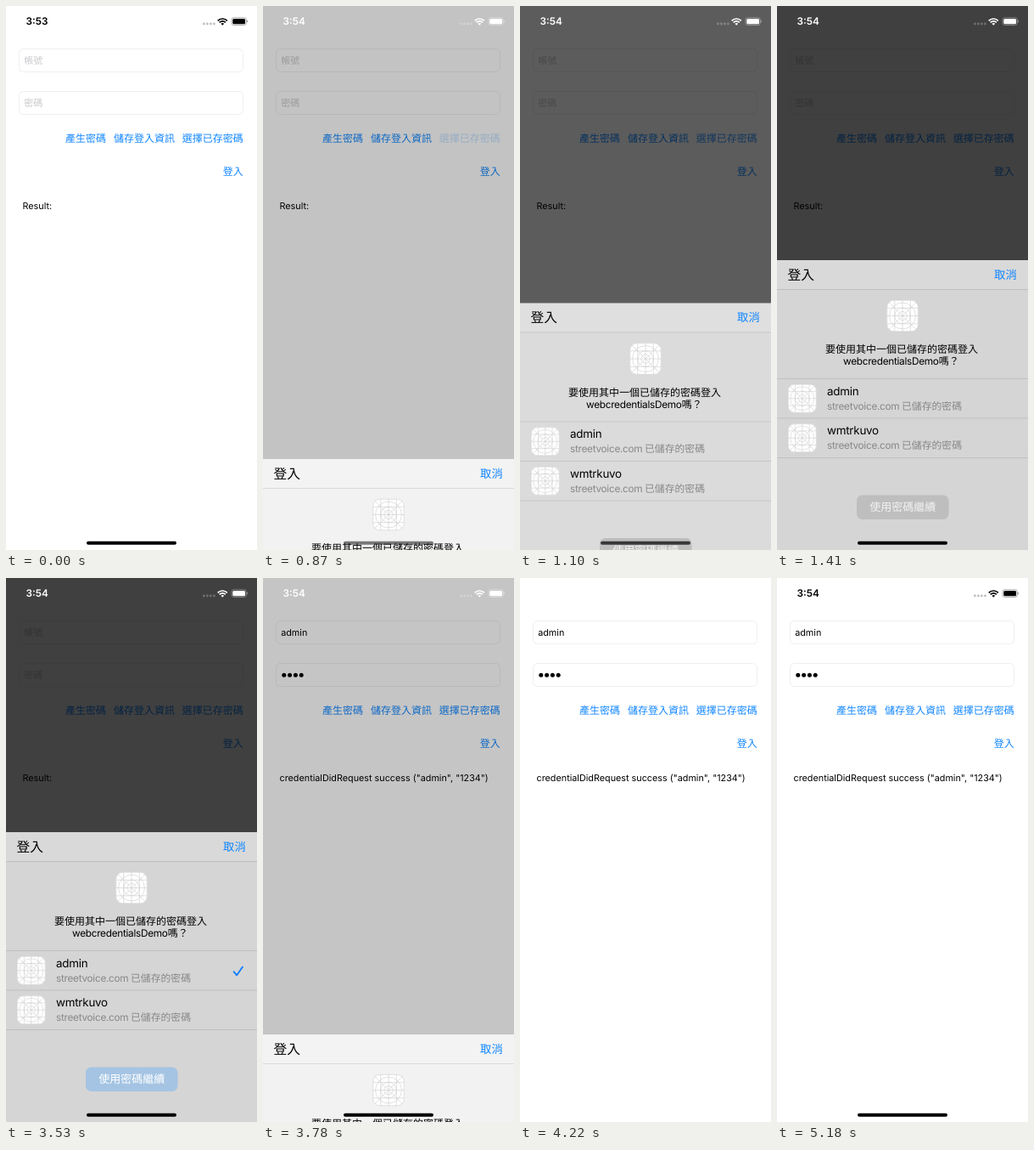
These frames come from a looping animation (296 by 640 pixels, 5.21 s). An HTML page:

```html
<!DOCTYPE html>
<html lang="zh-Hant">
<head>
<meta charset="utf-8">
<title>Saved password sign-in</title>
<style>
  html, body { margin: 0; width: 100%; height: 100%; overflow: hidden; background: #fff; }
  svg { display: block; width: 296px; height: 640px; }
  text { font-family: Inter, "Noto Sans CJK TC", "Noto Sans CJK", sans-serif; white-space: pre;
    text-rendering: geometricPrecision; }
  .small { font-size: 10.8px; }
  .link { font-size: 12px; fill: #1086ff; }
  .hint { font-size: 11.05px; fill: #c9c9cc; }
  .msg { font-size: 12px; }
  .latin { font-size: 11.84px; letter-spacing: -.3px; }
  .name { font-size: 13.4px; letter-spacing: -.25px; }
  .note { font-size: 11.84px; fill: #888; }
  .field { fill: #fff; stroke: #efefef; }
  .rule { stroke: #000; stroke-opacity: .13; stroke-width: .8; }
</style>
</head>
<body>
<svg viewBox="0 0 296 640">
  <defs>
    <g id="icon">
      <rect width="36" height="36" rx="8" fill="#fff"/>
      <g fill="none" stroke="#cdcdcd" stroke-width=".6">
        <rect x=".3" y=".3" width="35.4" height="35.4" rx="7.7"/>
        <path d="M0 9H36M0 18H36M0 27H36M9 0V36M18 0V36M27 0V36M2 2L34 34M34 2L2 34"/>
        <circle cx="18" cy="18" r="15"/>
        <circle cx="18" cy="18" r="9"/>
        <circle cx="18" cy="18" r="5"/>
      </g>
    </g>
  </defs>

  <rect width="296" height="640" fill="#fff"/>
  <rect class="field" x="15.5" y="50.5" width="264" height="27" rx="5"/>
  <rect class="field" x="15.5" y="100.5" width="264" height="27" rx="5"/>
  <g id="empty">
    <text class="hint" x="21.3" y="68">帳號</text>
    <text class="hint" x="21.3" y="118">密碼</text>
    <text class="small" x="19.5" y="239">Result:</text>
  </g>
  <g id="filled">
    <text class="small" x="21.2" y="67.8">admin</text>
    <g id="dots"></g>
    <text class="small" x="19.5" y="239">credentialDidRequest success ("admin", "1234")</text>
  </g>
  <text class="link" x="70" y="159.7">產生密碼</text>
  <text class="link" x="127" y="159.7">儲存登入資訊</text>
  <text class="link" id="pick" x="207.7" y="159.7">選擇已存密碼</text>
  <text class="link" x="255.7" y="199.4">登入</text>

  <rect id="dim" width="296" height="640"/>

  <g id="sheet">
    <rect y="1" width="296" height="343" fill="#fff" fill-opacity=".78"/>
    <rect y="1" width="296" height="34" fill="#fff" fill-opacity=".1"/>
    <text x="12.6" y="23.6" font-size="15.7" font-weight="500">登入</text>
    <text x="256" y="22.8" font-size="13.4" fill="#1086ff">取消</text>
    <path class="rule" d="M0 35.5H296M0 140.5H296M0 187H296M0 233.5H296"/>
    <use href="#icon" transform="translate(129.5 48) scale(1.03)"/>
    <text class="msg" x="57" y="110.4">要使用其中一個已儲存的密碼登入</text>
    <text class="msg" x="78" y="124.4"><tspan class="latin">webcredentialsDemo</tspan>嗎？</text>
    <g id="rows"></g>
    <path id="check" d="M268.6 165.2L272.2 169.3L279 159.6" fill="none" stroke="#0a7cff"
      stroke-width="1.8" stroke-linecap="round" stroke-linejoin="round"/>
    <rect id="button" x="94" y="277.5" width="108.5" height="28.5" rx="6.5"/>
    <text id="label" x="148.2" y="296.4" font-size="13" text-anchor="middle">使用密碼繼續</text>
  </g>

  <g id="status">
    <text id="clock" x="23.6" y="22.3" font-size="11.8" font-weight="600"></text>
    <g id="signal" opacity=".25"></g>
    <path d="M249.7 17.3a8 8 0 0 1 11.2 0M251.7 19.4a5 5 0 0 1 7.2 0" fill="none"
      stroke="currentColor" stroke-width="1.7"/>
    <path d="M255.3 22.8l-1.9-2a2.8 2.8 0 0 1 3.8 0z"/>
    <rect x="266" y="13.7" width="17.4" height="8.8" rx="2.6" fill="none" stroke="currentColor"
      stroke-opacity=".4" stroke-width=".8"/>
    <rect x="267.3" y="15" width="14.8" height="6.2" rx="1.5"/>
    <path d="M284.2 16.6a1.7 1.7 0 0 1 0 3z" opacity=".5"/>
  </g>
  <rect id="home" x="95" y="629.8" width="106" height="4" rx="2"/>
</svg>

<script>
const LOOP = 5210, TRAVEL = 342, DIM = .75;
const PRESS = 620, OPEN = 870, CHOOSE = 3530, FILL = 3640, CLOSE = 3780, RESTORE = 4320;
const $ = id => document.getElementById(id);
const set = (id, key, value) => $(id).setAttribute(key, value);
const show = (id, on) => $(id).style.visibility = on ? "visible" : "hidden";

// Progress 0..1 that advances in n equal held steps of the given length.
const stepped = (t, start, length, n) =>
  Math.max(0, Math.min(n, Math.floor((t - start) / length))) / n;
const left = p => (1 - p) ** 3;

const row = (name, y) => `
  <use href="#icon" transform="translate(13 ${y + 7}) scale(.93)"/>
  <text class="name" x="59" y="${y + 19.5}">${name}</text>
  <text class="note" x="59" y="${y + 36.5}"><tspan class="latin">streetvoice.com</tspan></text>
  <text class="note" x="147" y="${y + 36.8}">已儲存的密碼</text>`;
const dots = (x, y, gap, r) => [0, 1, 2, 3]
  .map(i => `<circle cx="${x + i * gap}" cy="${y}" r="${r}"/>`).join("");

$("rows").innerHTML = row("admin", 140) + row("wmtrkuvo", 186.5);
$("dots").innerHTML = dots(24.8, 114.3, 6.8, 2.5);
$("signal").innerHTML = dots(233.4, 21, 4, 1.4);

function draw(t) {
  const rise = stepped(t, OPEN, 108, 5);
  const fall = stepped(t, CLOSE, 110, 4);
  const fade = stepped(t, RESTORE - 105, 105, 5);

  // The sheet settles with a cubic ease-out, both opening and closing.
  let open = 0;
  if (t >= CLOSE) open = .304 * left(fall);
  else if (t >= OPEN) open = 1 - .684 * left(rise);

  let home = 1;
  if (t >= CLOSE) home = 1 - fall + fade;
  else if (t >= OPEN) home = .5 + .5 * rise;

  const chosen = t >= CHOOSE, filled = t >= FILL;
  const ink = t < OPEN ? 0 : Math.round(255 * (1 - fade));
  const color = `rgb(${ink},${ink},${ink})`;

  set("sheet", "transform", `translate(0 ${640 - TRAVEL * open})`);
  set("dim", "opacity", DIM * open);
  set("pick", "opacity", t < PRESS ? 1 : .25 + .75 * Math.min(1, rise * 2));
  set("status", "fill", color);
  set("status", "color", color);
  set("home", "opacity", home);
  set("button", "fill", chosen ? "#a5c4e3" : "#bebebe");
  set("label", "fill", chosen ? "#fff" : "#f2f2f2");
  $("clock").textContent = t < OPEN ? "3:53" : "3:54";
  show("check", chosen);
  show("empty", !filled);
  show("filled", filled);
}

const begin = performance.now();
function tick() {
  draw((performance.now() - begin) % LOOP);
  requestAnimationFrame(tick);
}
draw(0);
requestAnimationFrame(tick);
</script>
</body>
</html>
```
